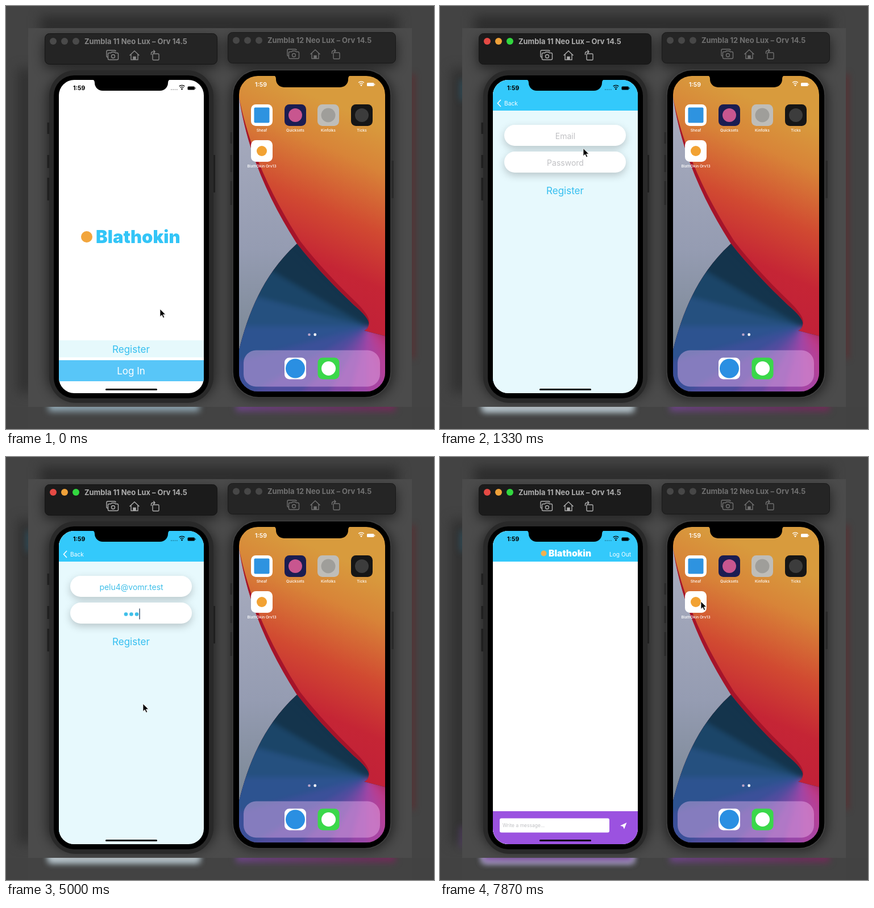
These frames come from a looping animation (753 px wide and 744 px high, 8000 ms). An HTML page:

```html
<!DOCTYPE html>
<html lang="en">
<head>
<meta charset="utf-8">
<title>Two phones</title>
<style>
  html, body { margin: 0; height: 100%; overflow: hidden; background: #414141; }
  svg { display: block; width: 100vw; height: 100vh; font-family: Inter, sans-serif; }
  .soft { filter: blur(10px); }
  .glow { filter: blur(6px); }
  .heavy { font-weight: 900; }
  .bar { font-size: 12.9px; font-weight: 700; fill: currentColor; }
  .button { font-size: 17px; text-anchor: middle; fill: #35bff0; }
  .input { font-size: 14px; text-anchor: middle; fill: #3fbfe9; }
  .hint { fill: #c0c1c4; }
  .nav { font-size: 10.2px; fill: #fff; }
  .label { font-size: 6.7px; font-weight: 500; text-anchor: middle; fill: #fff; }
  .line { fill: none; stroke: currentColor; stroke-width: 1.4; }
  .field { fill: #fff; filter: drop-shadow(0 5px 7px #0003); }
  #fan { filter: blur(4px); }
</style>
</head>
<body>
<svg viewBox="0 0 753 744" preserveAspectRatio="none">
  <defs>
    <clipPath id="screenA"><rect x="93" y="130" width="255" height="551" rx="27"/></clipPath>
    <clipPath id="screenB"><rect x="410" y="123" width="257" height="555" rx="33"/></clipPath>
    <path id="fold" d="M512 418C548 464 585 500 612 526Q641 550 638 561Q637 568 630 571L680 584V690H400L410 605C425 545 450 475 512 418z"/>
    <clipPath id="foldClip"><use href="#fold"/></clipPath>
    <linearGradient id="red" x1=".2" x2="0" y2="1">
      <stop stop-color="#d89b3d"/><stop offset=".14" stop-color="#d88438"/>
      <stop offset=".33" stop-color="#d14a31"/><stop offset=".5" stop-color="#c52535"/>
      <stop offset=".75" stop-color="#bf1e3a"/><stop offset=".9" stop-color="#b02a58"/>
    </linearGradient>
    <linearGradient id="grey" x2="0" y2="1">
      <stop stop-color="#a9adbf"/><stop offset=".6" stop-color="#959cb2"/><stop offset="1" stop-color="#7a8794"/>
    </linearGradient>
    <linearGradient id="glowB"><stop stop-color="#6c4585"/><stop offset="1" stop-color="#6e2c55"/></linearGradient>
    <g id="tools" class="line">
      <path d="M180 90h-1a2 2 0 0 1-2-2v-8a2 2 0 0 1 2-2h12a2 2 0 0 1 2 2"/>
      <path d="M181.500 82.500h3l1.500-1.500h5l1.500 1.500h3a2 2 0 0 1 2 2v8a2 2 0 0 1-2 2h-14a2 2 0 0 1-2-2v-8a2 2 0 0 1 2-2z"/>
      <circle cx="188.500" cy="88.500" r="3"/>
      <path d="M217.500 87l8.500-8 8.500 8M220 85v9.500h12V85"/>
      <path d="M224 94.500v-5h4v5" fill="currentColor"/>
      <rect x="258" y="84" width="11" height="11" rx="1.500"/>
      <path d="M255.500 86v-2.500a3 3 0 0 1 3-3h3M259.500 77.500l2.500 3-2.500 3"/>
    </g>
    <g id="signal" fill="currentColor">
      <path class="line" d="M-4.800-4.200a7 7 0 0 1 9.600 0M-2.900-1.800a4.300 4.300 0 0 1 5.800 0"/>
      <path d="M0 2.200l-1.700-2a2.400 2.400 0 0 1 3.400 0z"/>
      <rect x="10" y="-4" width="12.500" height="6" rx="1.600"/><rect x="23.200" y="-2.200" width="1" height="2.500"/>
    </g>
  </defs>

  <!-- blurred surroundings -->
  <rect width="753" height="744" fill="#434343"/>
  <g class="soft">
    <rect x="60" y="18" width="630" height="30" fill="#2c2c2c"/>
    <rect x="20" y="110" width="30" height="570" fill="#313131"/>
  </g>
  <g class="glow">
    <rect x="712" y="120" width="6" height="500" fill="#62262a"/>
    <rect x="405" y="690" width="280" height="23" fill="url(#glowB)"/>
    <rect x="75" y="690" width="265" height="23" fill="#93aab6"/>
  </g>
  <rect class="glow" id="glowForm" x="75" y="690" width="265" height="23" fill="#bcc5ca"/>
  <g id="glowChat" class="glow">
    <rect x="75" y="690" width="265" height="23" fill="#845aa6"/>
    <rect x="36" y="650" width="6" height="36" fill="#5c4075"/>
  </g>
  <rect class="glow" id="glowNav" x="37" y="130" width="5" height="36" fill="#28607a"/>

  <rect x="39" y="39" width="675" height="666" fill="#4b4b4b"/>
  <g class="soft" opacity=".5">
    <rect x="66" y="56" width="308" height="54" rx="9"/><rect x="388" y="54" width="300" height="54" rx="9"/>
    <rect x="72" y="118" width="298" height="576" rx="46"/><rect x="394" y="116" width="288" height="576" rx="46"/>
  </g>
  <path d="M0 705h39v39H0zM714 705h39v39h-39z" fill="#434343" opacity=".5"/>

  <!-- window bars -->
  <g id="barA">
    <rect id="plateA" x="68.500" y="48.500" width="303" height="54" rx="8" stroke="#151515"/>
    <g id="lights"><circle cx="83" cy="62" r="6"/><circle cx="103" cy="62" r="6"/><circle cx="123" cy="62" r="6"/></g>
    <text class="bar" x="138" y="66.500">Zumbla 11 Neo Lux – Orv 14.5</text>
    <use href="#tools"/>
  </g>
  <g color="#707070">
    <rect x="390.500" y="46.500" width="295" height="54" rx="8" fill="#252525" stroke="#191919"/>
    <g fill="#474747"><circle cx="405" cy="60.500" r="6"/><circle cx="425" cy="60.500" r="6"/><circle cx="445" cy="60.500" r="6"/></g>
    <text class="bar" x="460" y="65">Zumbla 12 Neo Lux – Orv 14.5</text>
    <use href="#tools" x="318" y="-2"/>
  </g>

  <!-- left phone -->
  <path d="M74.500 205v20m0 37v23m0 17v40M366 262v66" stroke="#1f1f1f" stroke-width="4"/>
  <rect x="76" y="113" width="289" height="585" rx="46" fill="#292929"/>
  <rect x="84" y="122" width="273" height="568" rx="36"/>
  <g clip-path="url(#screenA)">
    <g id="welcome">
      <rect x="93" y="130" width="255" height="551" fill="#fff"/>
      <circle cx="142" cy="406" r="10" fill="#f2a53c"/>
      <text class="heavy" x="158" y="417" font-size="31" fill="#33c5f7">Blathokin</text>
      <rect x="93" y="588" width="255" height="30" fill="#e6f9fc"/>
      <text class="button" x="220" y="610">Register</text>
      <rect x="93" y="623" width="255" height="37" fill="#58c6f8"/>
      <text class="button" x="220" y="648" style="fill:#fff">Log In</text>
      <rect id="dimWelcome" x="93" y="130" width="255" height="551"/>
    </g>
    <g id="form">
      <rect x="93" y="130" width="255" height="551" fill="#e7f9fd"/>
      <rect class="field" x="113" y="209" width="214" height="37" rx="18.500"/>
      <rect class="field" x="113" y="256" width="214" height="37" rx="18.500"/>
      <text class="input" id="email" x="220.500" y="234"></text>
      <text class="input hint" id="passHint" x="220.500" y="281">Password</text>
      <g id="dots" fill="#3fbfe9"></g>
      <rect id="caret" width="1.600" height="19" fill="#4d6079"/>
      <text class="button" x="220" y="331">Register</text>
      <rect id="dimForm" x="93" y="130" width="255" height="551"/>
    </g>
    <g id="chat">
      <rect x="93" y="184" width="255" height="497" fill="#fff"/>
      <rect x="93" y="623" width="255" height="58" fill="#9b52e0"/>
      <rect x="105" y="635.500" width="193" height="25" rx="3" fill="#fff"/>
      <text class="hint" x="110" y="651" font-size="8.500">Write a message...</text>
      <path d="M317 648.500l11.500-5.500-4.500 11.500-2-4.500z" fill="#fff"/>
    </g>
    <g id="nav">
      <rect x="93" y="130" width="255" height="54" fill="#33c9fb"/>
      <g id="back">
        <path d="M107 165l-5.500 6 5.500 6" fill="none" stroke="#fff" stroke-width="1.500"/>
        <text class="nav" x="113" y="174.500">Back</text>
      </g>
      <g id="title">
        <circle cx="182.500" cy="169.500" r="5" fill="#f2b04e"/>
        <text class="heavy" x="191" y="175" font-size="15.700" fill="#fff">Blathokin</text>
      </g>
      <text class="nav" id="logout" x="298" y="174.500">Log Out</text>
    </g>
    <path d="M150 129q6 0 6 6a14 14 0 0 0 14 14h101a14 14 0 0 0 14-14q0-6 6-6z"/>
    <text x="118" y="148" font-size="10.500" font-weight="700">1:59</text>
    <path d="M290 147h12" stroke="#0006" stroke-width="1.700" stroke-dasharray="1.700 1.600"/>
    <use href="#signal" x="309.500" y="145.500"/>
    <rect x="175" y="673" width="91" height="3" rx="1.500"/>
  </g>

  <!-- right phone -->
  <path d="M396.500 222v20m0 20v30m0 16v42M680 272v66" stroke="#2a2a2a" stroke-width="4"/>
  <rect x="399" y="112.500" width="278" height="576" rx="45" stroke="#404040" stroke-width="1.500"/>
  <g clip-path="url(#screenB)">
    <rect x="410" y="123" width="257" height="555" fill="url(#red)"/>
    <path d="M410 160C425 260 465 345 512 418C450 475 425 545 410 605z" fill="url(#grey)"/>
    <path d="M410 160C425 260 465 345 512 418C548 464 585 500 612 526Q641 550 638 561Q644 549 617 522C590 496 553 459 518 414C472 342 429 258 410 160z" fill="#a5142a"/>
    <use href="#fold" fill="#14344c"/>
    <g clip-path="url(#foldClip)"><g id="fan"></g></g>
    <path d="M469 122q6 0 6 6a14 14 0 0 0 14 15h99a14 14 0 0 0 14-15q0-6 6-6z"/>
    <text x="438" y="142" font-size="10.500" font-weight="600" fill="#fff">1:59</text>
    <g color="#fff"><use href="#signal" x="625" y="139"/></g>
    <circle cx="533.500" cy="578" r="2.300" fill="#b9a3c8"/><circle cx="543.700" cy="578" r="2.400" fill="#fff"/>
    <rect x="418" y="605.500" width="240" height="64" rx="22" fill="#f6bdf4" opacity=".4"/>
    <g id="apps"></g>
  </g>

  <path id="cursor" d="M0 0v13.500l3.200-2.900 2.300 5 2.200-1-2.200-4.800h4.300z" stroke="#fff" stroke-width=".8"/>
</svg>
<script>
const $ = id => document.getElementById(id);
const LOOP = 8000;
const ADDRESS = 'pelu4@vomr.test';
const ACTIVE_AT = 840, FORM_AT = 900, CHAT_AT = 6280;
const EMAIL_FOCUS = 1900, PASS_FOCUS = 4265, DOTS_AT = 4660, DOT_STEP = 132, DOT_GAP = 9.5;

// [time, characters typed]
const typing = [[2465, 3], [2665, 5], [2925, 6], [3125, 7], [3265, 8], [3325, 9],
  [3465, 10], [3530, 11], [3600, 12], [3665, 14], [3865, 15]];

// [time, x, y] of the pointer tip
const pointer = [[0, 271, 533], [70, 271, 533], [700, 266, 596], [900, 266, 596],
  [1340, 252, 250], [1500, 249, 228], [1850, 249, 228], [2330, 241, 434], [5400, 241, 434],
  [6120, 236, 319], [6470, 235, 317], [7070, 484, 298], [7460, 484, 298], [7465, 466, 256],
  [7600, 466, 256], [7870, 459, 254], [LOOP, 459, 254]];

// wallpaper rays spread from one point: colours by angle in equal steps
const rays = ['#14344c', '#1b4568', '#25507f', '#2d5390', '#3b5099', '#504d9f',
  '#694ba3', '#8249a7', '#9847a8', '#a845a3', '#b54199', '#be3b8c', '#b8347a', '#b02c5e'];
const RAY_FROM = 225, RAY_STEP = -15;
const rim = deg => {
  const a = deg * Math.PI / 180;
  return `${636 + 340 * Math.cos(a)} ${563 + 340 * Math.sin(a)}`;
};
$('fan').innerHTML = rays.map((color, i) => {
  const a = RAY_FROM + i * RAY_STEP;
  return `<path d="M636 563L${rim(a)} ${rim(a + RAY_STEP)}z" fill="${color}"/>`;
}).join('');

// [x, y, tile, mark, round, size, label]
const apps = [
  [431, 173, '#fff', '#2e93e0', false, 27, 'Sheaf'],
  [490, 173, '#1b1d52', '#c8568f', true, 24, 'Quicksets'],
  [548, 173, '#bfbdb8', '#9f9e9a', true, 25, 'Kinfolks'],
  [607, 173, '#161616', '#3c3c3c', true, 24, 'Ticks'],
  [431, 236, '#fff', '#f2a233', true, 18, 'BlathOkin Orv13'],
  [490, 618.5, '#fff', '#2a8fe2', true, 34, ''],
  [548.5, 618.5, '#3ad84a', '#fff', true, 25, '']];
$('apps').innerHTML = apps.map(([x, y, tile, mark, round, size, label]) => {
  const inset = (38 - size) / 2;
  return `<rect x="${x}" y="${y}" width="38" height="38" rx="8.5" fill="${tile}"/>
    <rect x="${x + inset}" y="${y + inset}" width="${size}" height="${size}" rx="${round ? size / 2 : 2}" fill="${mark}"/>
    <text class="label" x="${x + 19}" y="${y + 47.5}">${label}</text>`;
}).join('');

const set = (id, name, value) => $(id).setAttribute(name, value);
const move = (id, x, y = 0) => set(id, 'transform', `translate(${x} ${y})`);
const fade = (id, value) => set(id, 'opacity', value);

// critically damped spring from 0 to 1
function push(t, start) {
  const k = Math.max(0, t - start) * 0.018;
  return k > 7 ? 1 : 1 - (1 + k) * Math.exp(-k);
}

function pointerAt(t) {
  const i = pointer.findIndex(p => p[0] > t);
  const [t0, x0, y0] = pointer[i - 1], [t1, x1, y1] = pointer[i];
  const u = (t - t0) / (t1 - t0), e = u * u * (3 - 2 * u);
  return [x0 + (x1 - x0) * e, y0 + (y1 - y0) * e];
}

function drawBar(active) {
  set('barA', 'color', active ? '#adadad' : '#888');
  set('plateA', 'fill', active ? '#1b1b1b' : '#242424');
  const colors = active ? ['#e54a44', '#efa23a', '#32d83f'] : ['#4a4a4a', '#4a4a4a', '#4a4a4a'];
  [...$('lights').children].forEach((light, i) => light.setAttribute('fill', colors[i]));
}

function drawForm(t) {
  const typed = typing.reduce((n, [at, count]) => t >= at ? count : n, 0);
  const email = $('email');
  email.textContent = typed ? ADDRESS.slice(0, typed) : 'Email';
  email.classList.toggle('hint', !typed);

  const count = t < DOTS_AT ? 0 : Math.min(6, 1 + Math.floor((t - DOTS_AT) / DOT_STEP));
  let dots = '';
  for (let i = 0; i < count; i++)
    dots += `<circle cx="${220.5 + (i - (count - 1) / 2) * DOT_GAP}" cy="276.5" r="3.3"/>`;
  $('dots').innerHTML = dots;
  fade('passHint', count ? 0 : 1);

  const onPass = t >= PASS_FOCUS;
  const width = onPass ? count * DOT_GAP : typed ? email.getComputedTextLength() : 0;
  set('caret', 'x', 220 + width / 2);
  set('caret', 'y', onPass ? 266.5 : 219.5);
  fade('caret', t >= EMAIL_FOCUS && t < CHAT_AT ? 1 : 0);
}

function draw(t) {
  const form = push(t, FORM_AT), chat = push(t, CHAT_AT);
  drawBar(t >= ACTIVE_AT);
  drawForm(t);
  move('welcome', -76 * form);
  move('form', 255 * (1 - form) - 76 * chat);
  move('nav', 255 * (1 - form));
  move('chat', 255 * (1 - chat));
  move('title', 135 * (1 - chat));
  fade('dimWelcome', 0.1 * form);
  fade('dimForm', 0.1 * chat);
  fade('title', chat);
  fade('logout', chat);
  fade('back', Math.max(0, 1 - chat * 1.1));
  fade('glowForm', form);
  fade('glowNav', form);
  fade('glowChat', chat);
  move('cursor', ...pointerAt(t));
}

function tick() {
  draw(performance.now() % LOOP);
  requestAnimationFrame(tick);
}
tick();
</script>
</body>
</html>
```
